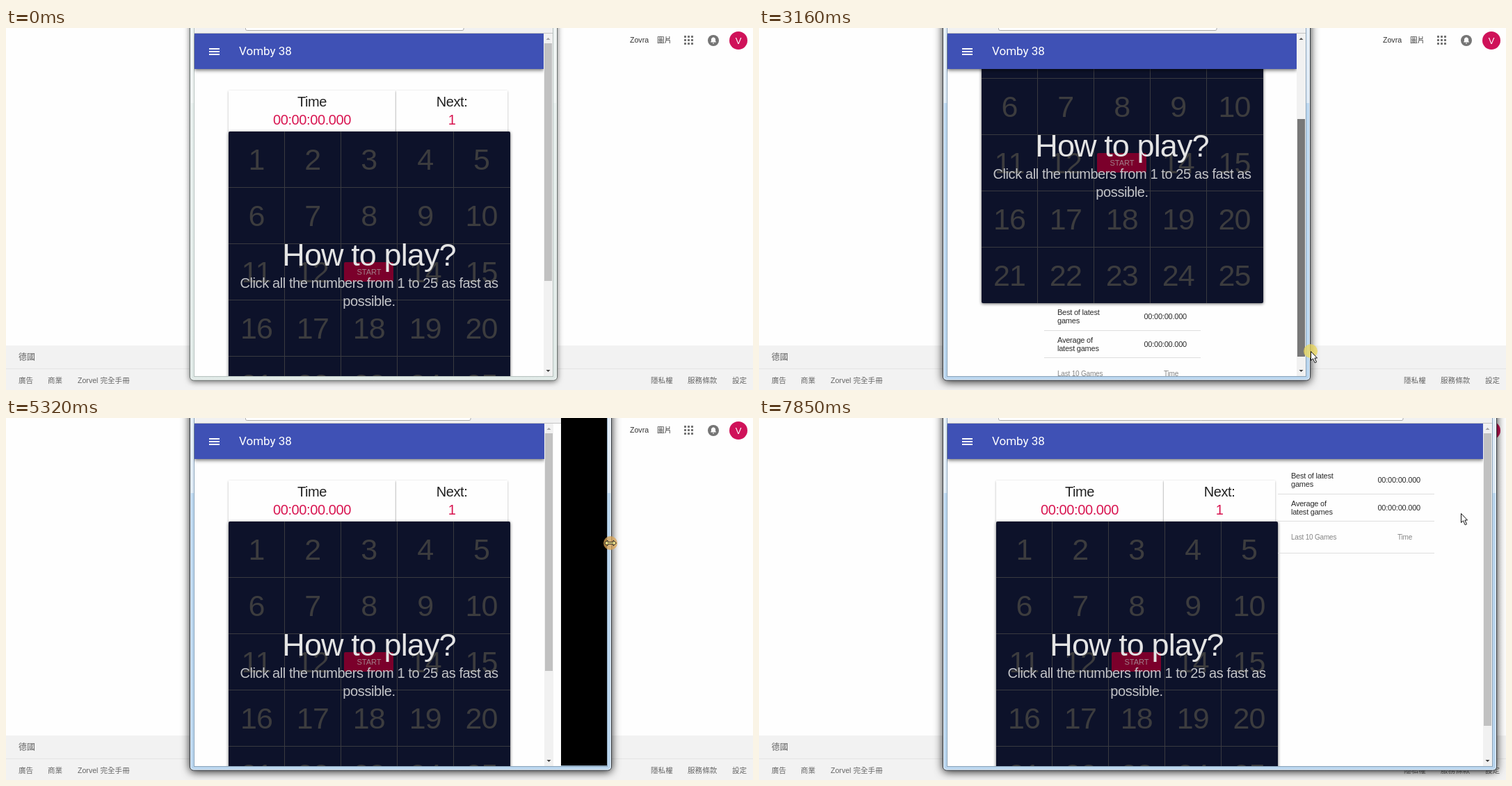
An HTML page with a canvas that plays this animation: 1074 by 521 pixels, repeating every 8 s.

```html
<!DOCTYPE html>
<html lang="zh-Hant">
<head>
<meta charset="utf-8">
<title>Vomby 38</title>
<style>
  html, body { margin: 0; width: 100%; height: 100%; overflow: hidden; background: #fff; }
  canvas { display: block; }
</style>
</head>
<body>
<canvas id="stage" width="1074" height="521"></canvas>
<script>
const ctx = document.getElementById('stage').getContext('2d');
const LOOP = 8000;
const SANS = '"Liberation Sans", Arial, sans-serif';
const CJK = '"Liberation Sans", "Noto Sans CJK TC", "Noto Sans CJK", sans-serif';
const LEFT = 271, TOP = 8, BOTTOM = 501;

// Each step overrides only what changes; everything else carries over.
// edge: window's right side, frame: painted frame's right side, view: page's right side
const steps = [
  { at: 0, edge: 793, frame: 793, view: 773, scroll: 0, active: false, thumb: '#c1c1c1', cursor: null },
  { at: 300, cursor: 'arrow', x: 950, y: 495 },
  { at: 620, x: 733, y: 360 },
  { at: 960, x: 750, y: 352 },
  { at: 1600, x: 751, y: 351 },
  { at: 1910, x: 786, y: 354, thumb: '#a8a8a8' },
  { at: 2220, x: 784, y: 347 },
  { at: 2550, x: 783, y: 347, active: true, thumb: '#787878', halo: 'rgba(200,188,40,.8)' },
  { at: 2850, x: 789, y: 444, scroll: 140, halo: 'rgba(235,215,90,.75)' },
  { at: 3160, x: 793, y: 465, scroll: 157 },
  { at: 3470, x: 793, y: 485, scroll: 176 },
  { at: 3790, x: 794, y: 500 },
  { at: 4110, x: 763, y: 204, scroll: 0, halo: 'rgba(250,238,90,.8)' },
  { at: 4400, x: 764, y: 169, halo: null },
  { at: 4720, cursor: 'resize', x: 789.5, y: 191, thumb: '#c1c1c1' },
  { at: 5010, x: 791, y: 187 },
  { at: 5320, x: 869, y: 180, edge: 871, frame: 803, view: 774, halo: 'rgba(220,165,85,.75)' },
  { at: 5640, x: 1008, y: 174, edge: 1010, frame: 928, view: 900 },
  { at: 5960, x: 1059, y: 170, edge: 1060, frame: 1060, view: 1040, halo: 'rgba(228,218,70,.85)' },
  { at: 6260, x: 1059, y: 168, edge: 1061, frame: 1061, view: 1041 },
  { at: 6580, halo: null },
  { at: 6910, cursor: 'beam', x: 801.5, y: 120 },
  { at: 7220, cursor: null },
  { at: 7530, cursor: 'beam', x: 924, y: 127 },
  { at: 7850, cursor: 'arrow', x: 1009, y: 137 }
];

function box(x, y, w, h, color) {
  ctx.fillStyle = color;
  ctx.fillRect(x, y, w, h);
}

function disc(x, y, r, color) {
  ctx.fillStyle = color;
  ctx.beginPath();
  ctx.arc(x, y, r, 0, 7);
  ctx.fill();
}

function text(str, x, y, size, color, align = 'left', family = SANS) {
  ctx.font = `${size}px ${family}`;
  ctx.textAlign = align;
  ctx.fillStyle = color;
  ctx.fillText(str, x, y);
}

function polygon(points, x, y, fill, stroke) {
  ctx.beginPath();
  points.forEach(([px, py]) => ctx.lineTo(x + px, y + py));
  ctx.closePath();
  ctx.fillStyle = fill;
  ctx.fill();
  if (stroke) {
    ctx.strokeStyle = stroke;
    ctx.lineWidth = 1;
    ctx.stroke();
  }
}

// The page sets all its type slightly tight.
function pageText(str, x, y, size, color, align) {
  ctx.letterSpacing = `${-.02 * size}px`;
  text(str, x, y, size, color, align);
  ctx.letterSpacing = '0px';
}

function withShadow(blur, color, offset, draw) {
  ctx.save();
  ctx.shadowBlur = blur;
  ctx.shadowColor = color;
  ctx.shadowOffsetY = offset;
  draw();
  ctx.restore();
}

function drawBackdrop() {
  box(0, 0, 1074, 521, '#fefefe');
  box(0, 457, 1074, 64, '#f2f2f2');
  box(0, 490, 1074, 1, '#e4e4e4');
  text('德國', 18, 478, 12, '#666', 'left', CJK);
  [['廣告', 18], ['商業', 60], ['Zorvel 完全手冊', 103], ['隱私權', 927], ['服務條款', 980], ['設定', 1044]]
    .forEach(([label, x]) => text(label, x, 511, 10.6, '#666', 'left', CJK));
  text('Zovra', 897, 21, 10.6, '#333', 'left', CJK);
  text('圖片', 936, 21, 10.6, '#333', 'left', CJK);
  for (let i = 0; i < 9; i++) box(975 + i % 3 * 5, 11 + Math.floor(i / 3) * 5, 3, 3, '#757575');
  disc(1017, 18, 8, '#757575');
  polygon([[-4, 3], [-3, 1], [-3, -2], [-1, -4], [1, -4], [3, -2], [3, 1], [4, 3]], 1017, 17.5, '#fff');
  box(1016, 21.5, 2, 1, '#fff');
  disc(1053, 18, 13, '#cf1259');
  text('V', 1053, 22.5, 13, '#fff', 'center');
}

function drawFrame({ edge, frame, active }) {
  const tint = ctx.createLinearGradient(0, 0, 0, 521);
  tint.addColorStop(0, active ? '#e3edf7' : '#eef3f2');
  tint.addColorStop(.207, active ? '#dde9f5' : '#eef3f2');
  tint.addColorStop(.208, active ? '#bcd7ef' : '#e6eeec');
  tint.addColorStop(1, active ? '#b9d5ee' : '#dfe9e6');
  withShadow(active ? 13 : 9, active ? 'rgba(0,0,0,.9)' : 'rgba(0,0,0,.6)', 2, () => {
    ctx.fillStyle = tint;
    ctx.beginPath();
    ctx.roundRect(264.5, -30, edge - 265, 537, 5);
    ctx.fill();
  });
  ctx.strokeStyle = active ? '#353b42' : '#66706d';
  ctx.lineWidth = 1;
  ctx.stroke();
  ctx.strokeStyle = 'rgba(255,255,255,.75)';
  ctx.beginPath();
  ctx.roundRect(265.5, -30, edge - 267, 536, 4);
  ctx.stroke();

  const inner = edge - 7;
  box(270, 0, inner - 269, BOTTOM + 1, active ? '#8ba4ba' : '#b7c2bf');
  box(LEFT, 0, inner - LEFT, BOTTOM - 1, '#000');
  const painted = Math.min(inner, frame - (frame < edge ? 5 : 7));
  box(LEFT, 0, painted - LEFT, BOTTOM, '#fefefe');
  box(LEFT, 0, painted - LEFT, 7, '#f1f1f1');
  box(LEFT, 7, painted - LEFT, 1, '#c4c4c4');
  ctx.fillStyle = '#fff';
  ctx.strokeStyle = '#a9a9a9';
  ctx.beginPath();
  ctx.roundRect(344.5, -12, frame - 135 - 344.5, 15.5, 2);
  ctx.fill();
  ctx.stroke();
}

function drawCard(x, y, width, label, value) {
  withShadow(3, 'rgba(0,0,0,.28)', 1, () => box(x, y, width, 59, '#fefefe'));
  pageText(label, x + width / 2, y + 23, 20, '#212121', 'center');
  pageText(value, x + width / 2, y + 49, 20, '#d81450', 'center');
}

function drawBoard(x, y) {
  const cell = 80.9, size = 405, mid = x + 202;
  withShadow(4, 'rgba(0,0,0,.6)', 1, () => {
    ctx.fillStyle = '#0d122a';
    ctx.beginPath();
    ctx.roundRect(x, y, size, size - 1, 2);
    ctx.fill();
  });
  for (let i = 1; i < 5; i++) {
    const offset = Math.round(i * cell - .5);
    box(x + offset, y, 1, size - 1, '#393a40');
    box(x, y + offset, size, 1, '#393a40');
  }
  for (let n = 1; n <= 25; n++) {
    if (n === 13) continue;
    const col = (n - 1) % 5, row = Math.floor((n - 1) / 5);
    pageText(n, x + 40 + col * cell, y + 55 + row * cell, 43, '#3c3c3e', 'center');
  }
  ctx.fillStyle = '#7b002b';
  ctx.beginPath();
  ctx.roundRect(x + 166, y + 188, 71, 28, 2);
  ctx.fill();
  text('START', mid, y + 206, 11, '#a17f8a', 'center');
  pageText('How to play?', mid, y + 193, 45, '#e4e4e4', 'center');
  pageText('Click all the numbers from 1 to 25 as fast as', mid, y + 225, 20, '#c2c3c7', 'center');
  pageText('possible.', mid, y + 251, 20, '#c2c3c7', 'center');
}

function drawTable(x, y) {
  [['Best of latest', 'games'], ['Average of', 'latest games']].forEach((lines, i) => {
    const top = y + i * 39.5;
    pageText(lines[0], x + 19, top, 11, '#2b2b2b');
    pageText(lines[1], x + 19, top + 12, 11, '#2b2b2b');
    pageText('00:00:00.000', x + 205, top + 6, 11, '#2b2b2b', 'right');
    box(x, Math.round(top + 21.6), 225, 1, '#dedede');
  });
  pageText('Last 10 Games', x + 19, y + 88, 10, '#858585');
  pageText('Time', x + 193, y + 88, 10, '#858585', 'right');
  box(x, y + 107, 225, 1, '#dedede');
}

function drawScrollbar({ view, scroll, thumb }, length) {
  box(view, TOP, 13, BOTTOM - TOP, '#f1f1f1');
  box(view + 1, Math.round(22 + scroll / 1.44), 11, length, thumb);
  polygon([[-3, 1.5], [0, -1.5], [3, 1.5]], view + 6.5, 15.5, scroll ? '#505050' : '#a3a3a3');
  polygon([[-3, -1.5], [0, 1.5], [3, -1.5]], view + 6.5, 493.5, '#404040');
}

function drawPage(state) {
  const { view, scroll } = state;
  const center = (LEFT + view) / 2;
  const wide = view - LEFT >= 629;
  const x = Math.floor(center - (wide ? 314.5 : 202));
  ctx.save();
  ctx.beginPath();
  ctx.rect(LEFT - 1, TOP, view - LEFT + 1, BOTTOM - TOP);
  ctx.clip();
  drawCard(x, 90 - scroll, 240, 'Time', '00:00:00.000');
  drawCard(x + 241, 90 - scroll, 160, 'Next:', '1');
  drawBoard(x, 149 - scroll);
  if (wide) drawTable(x + 405, 87);
  else drawTable(x + 90, 570 - scroll);
  withShadow(5, 'rgba(0,0,0,.55)', 2, () => box(LEFT, TOP, view - LEFT, 51, '#3f51b5'));
  [29, 33, 37].forEach(y => box(292, y, 15, 2, '#fff'));
  text('Vomby 38', 335, 39, 17, '#fff', 'left', 'Roboto, sans-serif');
  ctx.restore();
  drawScrollbar(state, wide ? 421 : 342);
}

const ARROW = [[0, 0], [0, 13], [3, 10.3], [5.7, 16.3], [8, 15.3], [5.4, 9.5], [9, 9.5]];
const RESIZE = [[-8.5, 0], [-4, -4], [-4, -1.3], [4, -1.3], [4, -4], [8.5, 0], [4, 4], [4, 1.3], [-4, 1.3], [-4, 4]];

function drawCursor({ cursor, x, y, halo }) {
  if (!cursor) return;
  if (halo) disc(x, y, 10, halo);
  if (cursor === 'arrow') polygon(ARROW, x + .5, y + .5, '#fff', '#111');
  if (cursor === 'resize') polygon(RESIZE, x, y, halo ? '#f3e58a' : '#fff', '#222');
  if (cursor === 'beam') {
    box(x - .5, y - 6, 1, 12, '#222');
    box(x - 3, y - 7, 6, 1, '#222');
    box(x - 3, y + 6, 6, 1, '#222');
  }
}

function render() {
  const time = performance.now() % LOOP;
  const state = Object.assign({}, ...steps.filter(step => step.at <= time));
  drawBackdrop();
  drawFrame(state);
  drawPage(state);
  drawCursor(state);
  requestAnimationFrame(render);
}
render();
</script>
</body>
</html>
```
